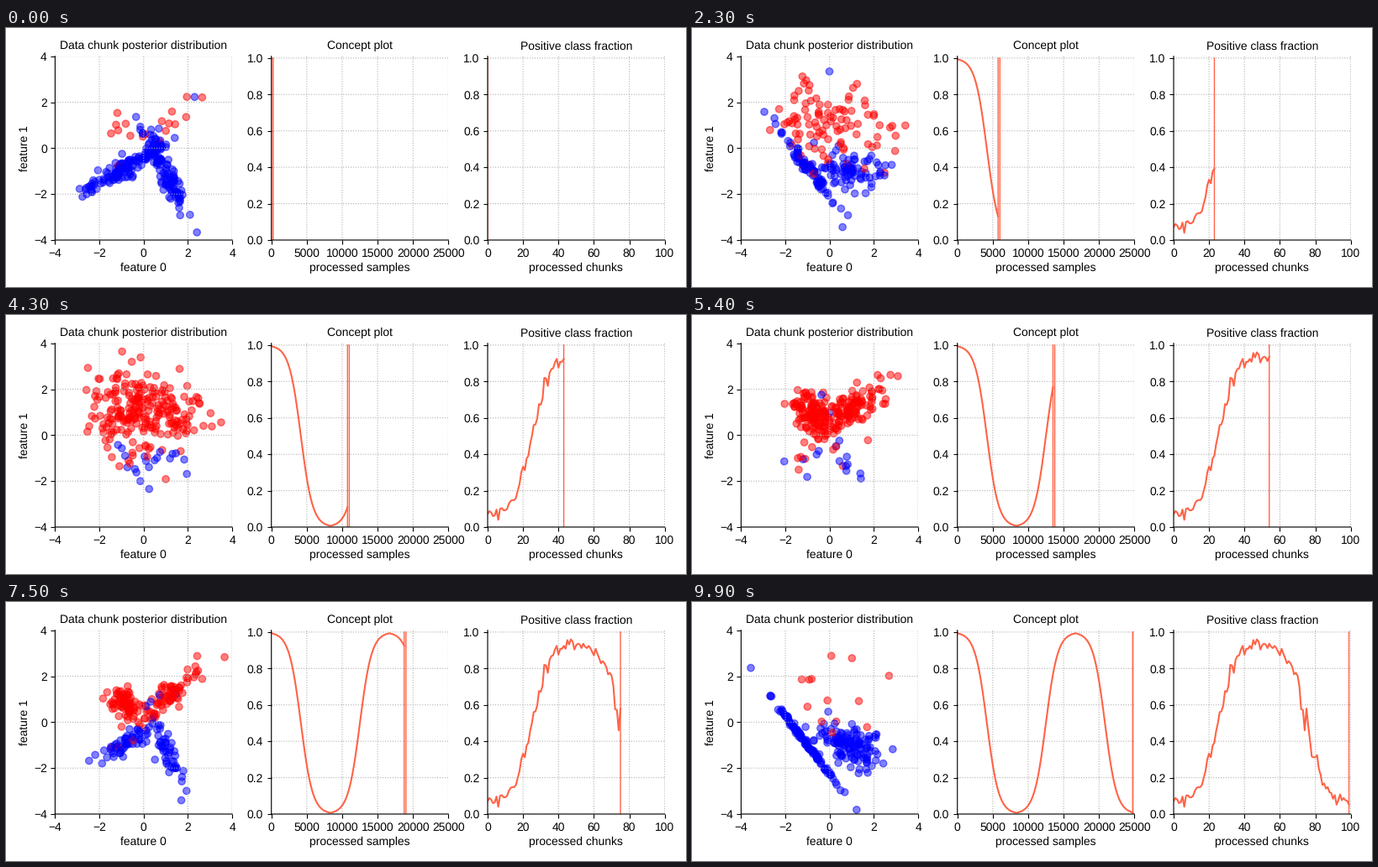
Recreate the animation shown at these times as a matplotlib script. Size 809 px wide and 309 px high, loop 10 s.

```python
import numpy as np
import matplotlib.pyplot as plt
from matplotlib.animation import FuncAnimation

W, H, DPI = 809, 309, 100
CHUNKS, SIZE = 100, 250
TOTAL = CHUNKS * SIZE
LINE = "tomato"

plt.rcParams.update({"font.family": "Liberation Sans", "font.size": 10,
                     "axes.titlesize": 10, "axes.labelsize": 10,
                     "axes.labelpad": 3, "text.hinting": "none",
                     "path.snap": False})

# Per class and cluster: x spread, y slope on x noise, y spread
CENTERS = np.array([[(-1, -1), (1, -1)], [(-1, 1), (1, 1)]], float)
CONCEPT_A = np.array([[(0.9, 0.46, 0.22), (0.48, -0.9, 0.42)],
                      [(0.42, -0.15, 0.42), (1.05, 0.75, 0.32)]])
CONCEPT_B = np.array([[(0.8, -1.0, 0.07), (0.85, -0.12, 0.42)],
                      [(0.8, -0.2, 1.15), (1.15, -0.3, 0.85)]])


def drift(t, count):
    """Sigmoid wave from 1 down to 0 and back, with `count` half turns."""
    phase = t * count
    sign = np.where(np.floor(phase) % 2, -1, 1)
    return 1 / (1 + np.exp(-sign * (5 - 10 * (phase % 1))))


def draw_samples(rng, shapes, classes):
    cluster = rng.integers(0, 2, len(classes))
    sx, slope, sy = shapes[classes, cluster].T
    u, v = rng.standard_normal((2, len(classes)))
    return CENTERS[classes, cluster] + np.column_stack([sx * u, slope * u + sy * v])


def make_chunk(i):
    rng = np.random.default_rng(100 + i)
    labels = (np.arange(SIZE) < positives[i]).astype(int)
    rng.shuffle(labels)
    classes = np.where(rng.random(SIZE) < 0.01, 1 - labels, labels)
    p = drift((i + 0.5) / CHUNKS, 3)
    points = (p * draw_samples(rng, CONCEPT_A, classes)
              + (1 - p) * draw_samples(rng, CONCEPT_B, classes))
    return points, labels


def add_panel(fig, column, title, xlabel, xlim, ylim, xstep):
    left = 58.4 + 257.3 * column
    ax = fig.add_axes([left / W, (H - 253) / H, 210.7 / W, 219.3 / H])
    ax.set(title=title, xlabel=xlabel, xlim=xlim, ylim=ylim,
           xticks=range(xlim[0], xlim[1] + 1, xstep))
    ax.spines[["top", "right"]].set_visible(False)
    ax.grid(ls=":")
    return ax


def marker(ax):
    return ax.plot([0, 0], [0, 1], c=LINE, lw=1)[0]


chunks = np.arange(CHUNKS)
samples = np.arange(TOTAL)
curve = drift(samples / TOTAL, 3)
balance = 0.94 - 0.88 * drift(chunks / CHUNKS, 2)
positives = np.random.default_rng(7).binomial(SIZE, balance)
share = positives / SIZE

fig = plt.figure(figsize=(W / DPI, H / DPI), dpi=DPI, facecolor="white")

ax_data = add_panel(fig, 0, "Data chunk posterior distribution", "feature 0",
                    (-4, 4), (-4, 4), 2)
ax_data.set(ylabel="feature 1", yticks=range(-4, 5, 2))
ax_concept = add_panel(fig, 1, "Concept plot", "processed samples",
                       (0, TOTAL), (0, 1.01), 5000)
ax_share = add_panel(fig, 2, "Positive class fraction", "processed chunks",
                     (0, CHUNKS), (0, 1.01), 20)

dots = ax_data.scatter(np.zeros(SIZE), np.zeros(SIZE), c=np.zeros(SIZE),
                       cmap="bwr", vmin=0, vmax=1, alpha=0.5)
concept_line, = ax_concept.plot([], [], c=LINE)
chunk_start, chunk_end = marker(ax_concept), marker(ax_concept)
share_line, = ax_share.plot([], [], c=LINE)
share_mark = marker(ax_share)


def update(i):
    points, labels = make_chunk(i)
    dots.set_offsets(points)
    dots.set_array(labels)
    start = i * SIZE
    concept_line.set_data(samples[:start], curve[:start])
    chunk_start.set_xdata([start, start])
    chunk_end.set_xdata([start + SIZE, start + SIZE])
    share_line.set_data(chunks[:i + 1], share[:i + 1])
    share_mark.set_xdata([i, i])
    return dots, concept_line, chunk_start, chunk_end, share_line, share_mark


anim = FuncAnimation(fig, update, frames=CHUNKS, interval=100, repeat=True)
plt.show()
```
